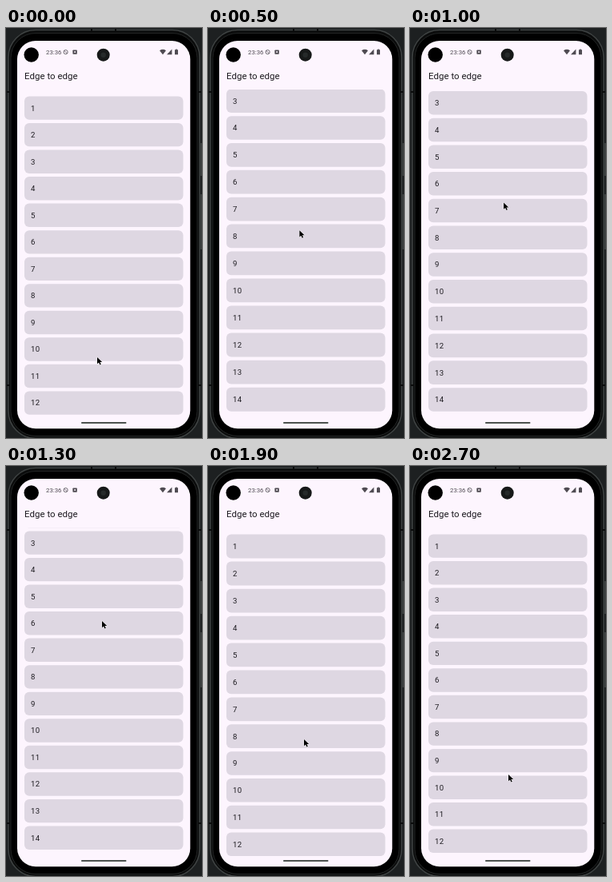
These frames come from a looping animation (245x513 px, 2800 ms). An HTML page:

```html
<!DOCTYPE html>
<html lang="en">
<head>
<meta charset="utf-8">
<title>Edge to edge</title>
<style>
  html, body { margin: 0; width: 100%; height: 100%; overflow: hidden; background: #1d2021; }
  svg { display: block; font-family: Roboto, sans-serif; }
  #list rect { fill: #ded7e2; }
  #list text { font-size: 9.6px; letter-spacing: .2px; fill: #1d1b20; }
</style>
</head>
<body>
<svg width="245" height="513" viewBox="0 0 245 513">
  <defs><clipPath id="view"><rect x="14" y="77" width="217" height="411"/></clipPath></defs>

  <!-- phone body -->
  <rect x="3" y="2.5" width="239" height="511" rx="34" fill="#0b0c0c" stroke="#3f4343" stroke-width="1.5"/>
  <path d="M107 1v4M137 1v4M1 80h4M1 447h4M240 80h4M240 447h4" stroke="#0b0c0c" stroke-width="2"/>
  <path d="M244 144v41M244 208v69" stroke="#484b4b" stroke-width="1.5"/>
  <rect x="6" y="6.5" width="233" height="504" rx="31" stroke="#2b2e2e" stroke-width=".8"/>
  <rect x="14" y="16" width="216.3" height="485.3" rx="23" fill="#fdf5fe"/>

  <!-- status bar -->
  <circle cx="31.7" cy="33.5" r="9.2"/>
  <circle cx="121.7" cy="33.7" r="8" fill="#171919"/>
  <circle cx="121.7" cy="33.7" r="3.2" fill="#262a2a"/>
  <g fill="#4f4b52">
    <text x="50" y="32.8" font-size="7.8">23:36</text>
    <path d="M72.7 28.2l3.8 3.8" stroke="#4f4b52" stroke-width=".8"/>
    <circle cx="74.6" cy="30.1" r="2.6" fill="none" stroke="#4f4b52" stroke-width=".8"/>
    <rect x="83.4" y="27.4" width="5.4" height="5.4" rx=".8"/>
    <circle cx="86.1" cy="30.1" r="1" fill="#fdf5fe"/>
    <path d="M192 28.2q4-2.8 8 0l-4 5zM207.4 26.6v6.6h-6.4zM211 27.2h1.2v-.8h1.6v.8h1.2v6h-4z"/>
  </g>
  <text x="23.1" y="64.1" font-size="11.5" fill="#1d1b20">Edge to edge</text>

  <g id="list" clip-path="url(#view)"></g>
  <rect x="94" y="493.1" width="56.5" height="1.9" rx=".9" fill="#4c514e"/>
  <path id="cursor" d="M0 0V8.2L2 6.4 3.4 9.5 4.8 8.8 3.4 5.9H6.2Z" stroke="#fff" stroke-width=".8" paint-order="stroke"/>
</svg>
<script>
const LOOP = 2800, STEP = 100;
const TOP = 77, BOTTOM = 488, PITCH = 33.545, CARD = 29.4, FIRST = 85.4;
const MAX_SCROLL = 71, MAX_STRETCH = .03;
const LAG = 60, SLOP = 4.5, SPRING = 85;

const clamp = (v, lo, hi) => Math.min(hi, Math.max(lo, v));

function ease(t, start, end) {
  const u = clamp((t - start) / (end - start), 0, 1);
  return u * u * (3 - 2 * u);
}

const swipeUp = t => 176 * ease(t, 0, 620);
const glide = t => ease(t, 800, 1250);
const swipeDown = t => 192 * ease(t, 1300, 2170);

// The list trails the pointer; travel past its end becomes stretch until release.
function drag(swipe, t, release) {
  const pulled = Math.max(0, swipe(t - LAG) - SLOP);
  const scroll = Math.min(pulled, MAX_SCROLL);
  const held = Math.min(MAX_STRETCH, (pulled - scroll) * .0003);
  return { scroll, stretch: held * Math.exp(-Math.max(0, t - release) / SPRING) };
}

// Negative stretch is anchored at the bottom edge, positive at the top.
function overscroll(y, stretch) {
  const d = stretch > 0 ? y - TOP : BOTTOM - y;
  return y + stretch * d * (1 - .37 * d / (BOTTOM - TOP));
}

function add(parent, tag, attrs) {
  const el = document.createElementNS("http://www.w3.org/2000/svg", tag);
  for (const key in attrs) el.setAttribute(key, attrs[key]);
  return parent.appendChild(el);
}

const list = document.getElementById("list");
const cursor = document.getElementById("cursor");
const cards = Array.from({ length: 14 }, (_, i) => {
  const box = add(list, "rect", { x: 23, width: 198.5, rx: 6 });
  const label = add(list, "text", { x: 31.1 });
  label.textContent = i + 1;
  return { box, label };
});

function draw(now) {
  const t = Math.floor(now % LOOP / STEP) * STEP;
  const up = drag(swipeUp, t, 900), down = drag(swipeDown, t, 2400);
  const scroll = up.scroll - down.scroll;
  const stretch = down.stretch || -up.stretch;
  cards.forEach(({ box, label }, i) => {
    const y = FIRST + i * PITCH - scroll;
    const top = overscroll(y, stretch), bottom = overscroll(y + CARD, stretch);
    box.setAttribute("y", top);
    box.setAttribute("height", bottom - top);
    label.setAttribute("y", (top + bottom) / 2 + 3.4);
  });
  const x = 114 + ease(t, 300, 800) + 5 * glide(t) + 3 * ease(t, 1900, 2300);
  const y = 412 - swipeUp(t) - 42 * glide(t) + swipeDown(t);
  cursor.setAttribute("transform", `translate(${x} ${y})`);
}

const start = performance.now();
function tick() {
  draw(performance.now() - start);
  requestAnimationFrame(tick);
}
tick();
</script>
</body>
</html>
```
